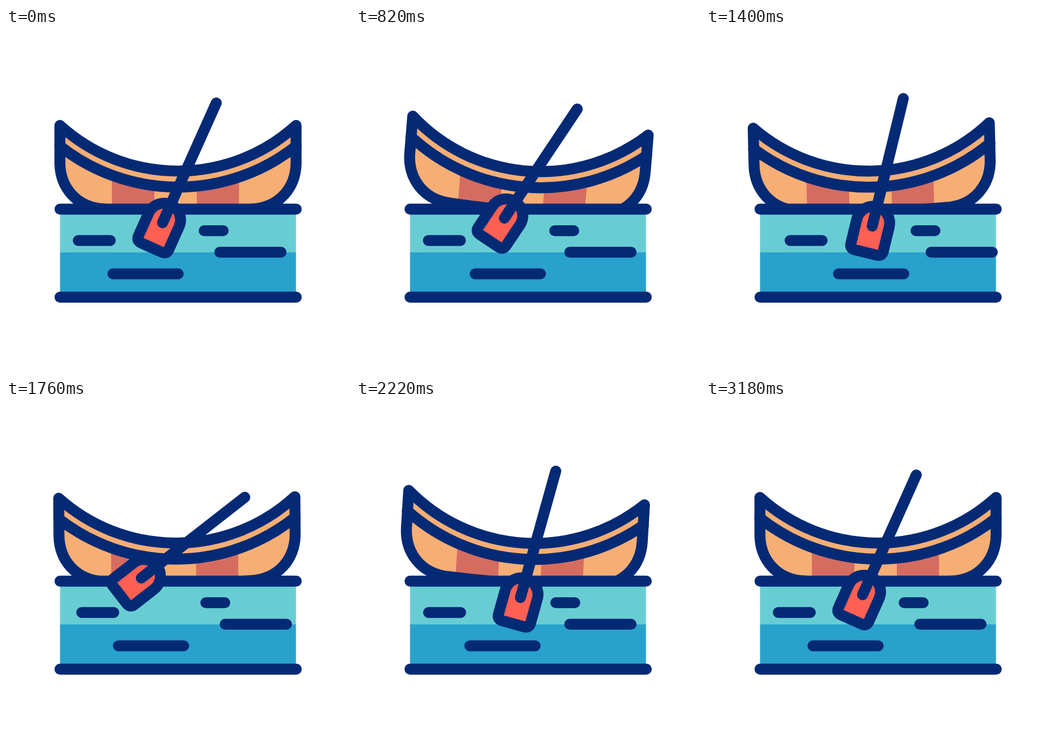
Recreate the animation shown at these times as an HTML page. Size 640 px wide and 640 px high, loop 3.6 s.

```html
<!DOCTYPE html>
<html lang="en">
<head>
<meta charset="utf-8">
<title>Canoe</title>
<style>
  html, body { margin: 0; width: 100%; height: 100%; overflow: hidden; background: #fff; }
  svg { display: block; width: 100%; height: 100%; }
  .line { fill: none; stroke: #042a75; stroke-width: 20.4; stroke-linecap: round; stroke-linejoin: round; }
</style>
</head>
<body>
<svg viewBox="0 0 640 640">
  <defs>
    <path id="hull" d="M100.3 181.3V250C100.3 295 130 335 185 337Q320 346 455 337C510 335 539.7 295 539.7 250V181.3A327 327 0 0 1 100.3 181.3Z"/>
    <clipPath id="side">
      <path d="M100 219.5A354.5 354.5 0 0 0 540 219.5V350H100Z"/>
    </clipPath>
  </defs>

  <g id="boat">
    <use href="#hull" fill="#f6ae74"/>
    <path d="M197 260h79v80h-79zM355 260h78.5v80h-78.5z" fill="#d56c60" clip-path="url(#side)"/>
    <use href="#hull" class="line"/>
    <path class="line" d="M100 219.5A354.5 354.5 0 0 0 540 219.5"/>
  </g>

  <path d="M100.5 337h439v81h-439z" fill="#68cdd3"/>
  <path d="M100.5 417.5h439v83h-439z" fill="#28a1cc"/>
  <path class="line" d="M100.5 337H540M100.5 500.7H540"/>
  <path class="line" id="waveA" d="M134.5 395.4H194"/>
  <path class="line" id="waveB" d="M368.7 377.1H404"/>
  <path class="line" id="waveC" d="M397.7 417.1H511.7"/>
  <path class="line" id="waveD" d="M199 457.4H320.3"/>

  <g id="paddle">
    <path class="line" style="fill:#ff6053" d="M-31 98.6A31 31 0 0 1 31 98.6V145Q31 155 21 155H-21Q-31 155 -31 145Z"/>
    <path class="line" d="M0 -139.8V104.4"/>
  </g>
</svg>
<script>
  const LOOP = 3600, END = 3180, STEP = 20, STROKE = 600;

  const clamp = u => Math.min(1, Math.max(0, u));
  const smooth = u => u * u * (3 - 2 * u);
  const easeOut = u => 1 - (1 - u) ** 3.2;
  const ramp = (t, from, to) => smooth(clamp((t - from) / (to - from)));

  // Rises from 0 to 1 at the peak, then falls back to 0.
  const pulse = (t, from, peak, to) => ramp(t, from, peak) - ramp(t, peak, to);

  // The paddle reverses after every stroke and glides back to rest in the last one.
  const turns = [24.15, 48.5, 0, 52.7, 5.4, 24.15];
  function paddleAngle(t) {
    const i = Math.min(Math.floor(t / STROKE), turns.length - 2);
    const last = i === turns.length - 2;
    const from = i * STROKE;
    const u = clamp((t - from) / (last ? END - from : STROKE));
    return turns[i] + (turns[i + 1] - turns[i]) * (last ? easeOut : smooth)(u);
  }

  const boatShift = t => -13 * (pulse(t, 600, 1160, 1920) + pulse(t, 1800, 2440, 2900));
  const boatTilt = t => 4.6 * pulse(t, 570, 820, 1300)
    - 1.4 * pulse(t, 1000, 1300, 2000)
    + 4.1 * pulse(t, 1800, 2100, 2600);

  const waves = {
    waveA: t => 22 * pulse(t, 790, 1400, 1960) + 15 * pulse(t, 2160, 2660, END),
    waveB: t => 22 * pulse(t, 730, 1400, 1870) + 14 * pulse(t, 2030, 2660, END),
    waveC: t => 21 * pulse(t, 800, 1400, 2100) + 23 * pulse(t, 2220, 2660, END),
    waveD: t => 52 * pulse(t, 430, 1280, 1950) + 24 * pulse(t, 1780, 2620, END)
  };

  const move = (id, transform) => document.getElementById(id).setAttribute('transform', transform);

  function draw(now) {
    const t = Math.floor((now % LOOP) / STEP) * STEP;
    move('boat', `translate(${boatShift(t)} 0) rotate(${boatTilt(t)} 320 294)`);
    move('paddle', `translate(334 267) rotate(${paddleAngle(t)})`);
    for (const id in waves) move(id, `translate(${waves[id](t)} 0)`);
  }

  const start = performance.now();
  function tick() {
    draw(performance.now() - start);
    requestAnimationFrame(tick);
  }
  tick();
</script>
</body>
</html>
```
